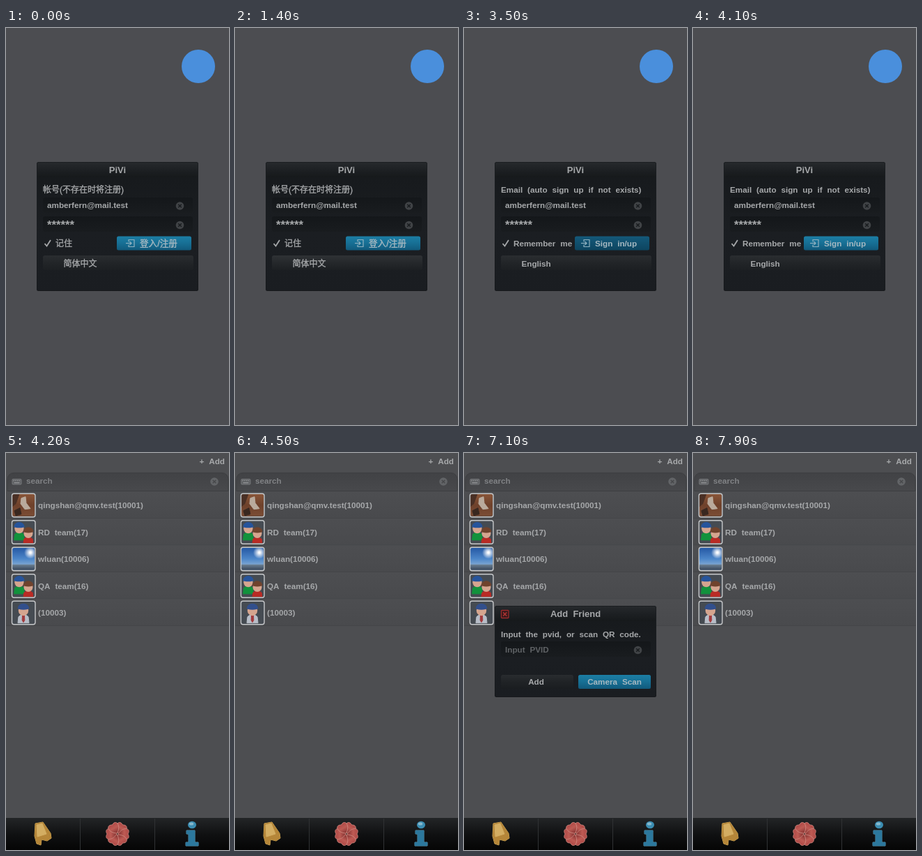
An HTML page with a canvas for the animation above (8 s loop, 320x569 px).

```html
<!DOCTYPE html>
<html lang="en">
<head>
<meta charset="utf-8">
<title>Messenger sign-in</title>
<style>
html, body { margin: 0; width: 100%; height: 100%; overflow: hidden; background: #4c4d51; }
canvas { display: block; width: 320px; height: 569px; }
</style>
</head>
<body>
<canvas id="stage"></canvas>
<script>
const W = 320, H = 569, LOOP = 8000;
const FONT = '"Liberation Sans", "Noto Sans CJK SC", "Noto Sans CJK", sans-serif';
const INK = '#a6a8aa', BUTTON_INK = '#a5b8c1';
const canvas = document.getElementById('stage');
const ctx = canvas.getContext('2d');
const ratio = window.devicePixelRatio || 1;
canvas.width = Math.round(W * ratio);
canvas.height = Math.round(H * ratio);
ctx.scale(ratio, ratio);

// Latin text is bold; Chinese text is regular with a thin outline.
function text(str, x, y, { size = 11.7, color = INK, align = 'left' } = {}) {
  const chinese = /[\u4e00-\u9fff]/.test(str);
  ctx.font = `${chinese ? 'normal' : 'bold'} ${size}px ${FONT}`;
  ctx.wordSpacing = '3.6px';
  ctx.textAlign = align;
  ctx.fillStyle = ctx.strokeStyle = color;
  ctx.fillText(str, x, y);
  if (chinese) {
    ctx.lineWidth = 0.35;
    ctx.strokeText(str, x, y);
  }
}

function vertical(y, h, colors) {
  const g = ctx.createLinearGradient(0, y, 0, y + h);
  colors.forEach((c, i) => g.addColorStop(i / (colors.length - 1), c));
  return g;
}

function box(x, y, w, h, fill, r = 0, stroke, width = 1) {
  ctx.beginPath();
  ctx.roundRect(x, y, w, h, r);
  ctx.fillStyle = Array.isArray(fill) ? vertical(y, h, fill) : fill;
  ctx.fill();
  if (stroke) {
    ctx.strokeStyle = stroke;
    ctx.lineWidth = width;
    ctx.stroke();
  }
}

function oval(x, y, rx, ry, fill, from = 0, to = Math.PI * 2) {
  ctx.beginPath();
  ctx.ellipse(x, y, rx, ry, 0, from, to);
  ctx.fillStyle = fill;
  ctx.fill();
}

function path(points, color, width, closed) {
  ctx.beginPath();
  for (let i = 0; i < points.length; i += 2) ctx.lineTo(points[i], points[i + 1]);
  if (closed) ctx.closePath();
  ctx.strokeStyle = color;
  ctx.lineWidth = width;
  ctx.stroke();
}

function shape(points, fill, stroke) {
  path(points, stroke || fill, 1, true);
  ctx.fillStyle = fill;
  ctx.fill();
}

function cross(x, y, r, color, width) {
  path([x - r, y - r, x + r, y + r], color, width);
  path([x - r, y + r, x + r, y - r], color, width);
}

function clearIcon(x, y, disc = '#404346', mark = '#191c1f') {
  oval(x, y, 5.8, 5.8, disc);
  cross(x, y, 2.3, mark, 1.5);
}

function panel(y, h, title) {
  box(44, y, 232, h, ['#1b1e21', '#1b1e22', '#17191c'], 2.5);
  box(45, y + 1, 230, 21, ['#26292c', '#1d2023', '#16191b'], [2, 2, 0, 0]);
  box(45, y + 22, 230, h - 23, ['#171a1d', '#1b1e22', '#1a1d21'], [0, 0, 2, 2]);
  text(title, 160, y + 16, { size: 13, align: 'center' });
}

function field(y) {
  box(53, y, 215, 22, ['#14171a', '#191c1f'], 3);
}

function blueButton(x, y, w, h, pressed) {
  box(x, y, w, h, pressed ? ['#14597a', '#0d4560'] : ['#1c7ea5', '#176f94', '#115a7c'], 2.5);
}

function enterIcon(x, y) {
  path([x + 4, y - 2, x + 4, y - 5, x + 12, y - 5, x + 12, y + 5, x + 4, y + 5, x + 4, y + 2], '#8fb1c0', 1.2);
  path([x, y, x + 8, y], '#8fb1c0', 1.2);
  path([x + 5.5, y - 2.5, x + 8, y, x + 5.5, y + 2.5], '#8fb1c0', 1.2);
}

const WORDS = {
  zh: { label: '帐号(不存在时将注册)', keep: '记住', enter: '登入/注册', lang: '简体中文', size: 12, enterSize: 12.6, icon: 172, enterX: 192 },
  en: { label: 'Email (auto sign up if not exists)', keep: 'Remember me', enter: 'Sign in/up', lang: 'English', size: 11.7, enterSize: 11.7, icon: 168, enterX: 188 }
};

function popup() {
  box(46, 284, 228, 92, '#191c1f');
  box(60, 286, 202, 27, ['#1d2023', '#232629'], 2);
  box(60, 316, 201, 27, ['#38446f', '#343f69']);
  box(60, 347, 202, 28, ['#232629', '#1c1f22'], 2);
  text('English', 90, 302);
  text('简体中文', 90.5, 333, { size: 12 });
  text('繁體中文', 90.5, 364, { size: 12 });
}

function login(words, { open, lit, pressed }) {
  box(0, 0, W, H, '#4c4d51');
  oval(276, 55, 24, 24, '#4a8fdc');
  panel(192, 185, 'PiVi');
  text(words.label, 53, 236, { size: words.size });
  field(243);
  field(270);
  text('amberfern@mail.test', 59, 258);
  text('******', 59, 288, { size: 16.7 });
  clearIcon(249.5, 255);
  clearIcon(249.5, 282.5);
  if (open) return popup();
  path([55.5, 309, 58.5, 312.5, 64, 304], INK, 1.8);
  text(words.keep, 71, 312.5, { size: words.size });
  blueButton(159, 298.5, 107, 20, pressed);
  enterIcon(words.icon, 308.5);
  text(words.enter, words.enterX, 312.5, { size: words.enterSize, color: BUTTON_INK });
  box(53, 326, 216, 21, lit ? ['#2f3235', '#25282b', '#1c1f22'] : ['#2a2d30', '#222528', '#1c1f22'], 3);
  text(words.lang, 82.5, 342, { size: words.size });
}

function person(x, y, s, hair, body, tie) {
  ctx.save();
  ctx.translate(x, y);
  ctx.scale(s, s);
  shape([-8, 17, -7, 8, -3, 5, 3, 5, 7, 8, 8, 17], body);
  if (tie) {
    shape([-1.5, 6, 1.5, 6, 1.8, 13, 0, 16, -1.8, 13], '#a33a3c');
  }
  oval(0, -1, 7.2, 7.5, '#d5a58f');
  oval(0, -4, 8.2, 7, hair, Math.PI, Math.PI * 2);
  oval(0, -4, 8.2, 2, hair);
  ctx.restore();
}

function petPhoto(y) {
  box(9, y - 16, 32, 32, ['#8a5639', '#6e412b', '#7b4d35']);
  shape([9, y - 16, 19, y - 16, 14, y - 2, 9, y + 2], '#4a3025');
  shape([22, y - 10, 28, y - 12, 29, y - 3, 35, y + 5, 27, y + 6, 21, y - 2], '#b9aa9c');
  shape([12, y + 8, 20, y + 4, 22, y + 13, 14, y + 15], '#392820');
}

function skyPhoto(y) {
  box(9, y - 16, 32, 32, ['#2558a4', '#4c86c9', '#a9c3db']);
  box(9, y + 8, 32, 8, ['#6d8295', '#38465a']);
  const sun = ctx.createRadialGradient(35, y - 9, 1, 35, y - 9, 9);
  sun.addColorStop(0, '#fff');
  sun.addColorStop(1, '#ffffff00');
  oval(35, y - 9, 9, 9, sun);
}

function avatar(kind, y) {
  box(8.5, y - 16.5, 33, 33, '#454b52', 3);
  ctx.save();
  ctx.beginPath();
  ctx.roundRect(9, y - 16, 32, 32, 2);
  ctx.clip();
  if (kind === 'pet') petPhoto(y);
  if (kind === 'sky') skyPhoto(y);
  if (kind === 'team') {
    person(19, y - 4, 0.92, '#26549b', '#12923c');
    person(32, y + 3, 0.9, '#70432d', '#b92b25');
  }
  if (kind === 'solo') person(25, y - 2, 1, '#324f8c', '#b8bec8', true);
  ctx.restore();
  ctx.beginPath();
  ctx.roundRect(8.5, y - 16.5, 33.5, 33.5, 3);
  ctx.strokeStyle = '#c6c8ca';
  ctx.lineWidth = 1.4;
  ctx.stroke();
}

const ROWS = [
  ['pet', 'qingshan@qmv.test(10001)'],
  ['team', 'RD team(17)'],
  ['sky', 'wluan(10006)'],
  ['team', 'QA team(16)'],
  ['solo', '(10003)']
];

function flower(x, y) {
  for (let i = 0; i < 6; i++) {
    ctx.save();
    ctx.translate(x, y);
    ctx.rotate(i * Math.PI / 3 + Math.PI / 6);
    ctx.beginPath();
    ctx.moveTo(0, -1);
    ctx.bezierCurveTo(-12, -9, -8, -20, 0, -15);
    ctx.bezierCurveTo(8, -20, 12, -9, 0, -1);
    ctx.fillStyle = vertical(-18, 17, ['#ab4442', '#bd5b54', '#82302f']);
    ctx.fill();
    ctx.strokeStyle = '#d08a80';
    ctx.lineWidth = 0.8;
    ctx.stroke();
    ctx.restore();
  }
}

function tabBar() {
  box(0, 523, W, 46, ['#232527', '#101112', '#050505']);
  for (const x of [106.5, 213.5]) path([x, 524, x, H], '#303234', 1);
  shape([42, 531, 53, 529, 64, 545, 65, 552, 59, 556, 51, 554, 50, 562, 44, 560, 41, 549], '#b58639', '#cfaa59');
  shape([44, 533, 52, 531, 58, 546, 45, 550], '#d3ad62');
  flower(160, 546);
  oval(267, 533, 6, 5.2, '#3b8db2');
  oval(266, 531.5, 3.2, 2, '#86b8cc');
  shape([259, 541, 271, 541, 271, 558, 276, 558, 276, 563, 258, 563, 258, 558, 262, 558, 262, 546, 259, 546], '#2c789d', '#5a9dba');
}

function contacts() {
  box(0, 0, W, H, '#4d4e51');
  text('+ Add', 314, 16, { align: 'right' });
  box(2, 28.5, 317, 26, ['#414245', '#48494c'], [9, 9, 0, 0], '#3d3e41');
  box(9, 37.5, 13, 7.5, '#5b5d60', 1, '#85878a', 0.8);
  for (let i = 0; i < 4; i++) box(10.5 + i * 2.7, 39, 1.6, 1.3, '#96989a');
  box(11.5, 42, 8, 1.3, '#96989a');
  text('search', 29, 44, { color: '#808285' });
  clearIcon(299, 41, '#626467', '#47484b');
  ROWS.forEach(([kind, name], i) => {
    const top = 55.5 + i * 38.5;
    box(0, top, W, 38, ['#4d4e51', '#494a4d']);
    path([0, top + 38, W, top + 38], '#434447', 0.8);
    avatar(kind, top + 19.2);
    text(name, 46, top + 23.5);
  });
  tabBar();
}

function addDialog() {
  panel(219, 131, 'Add Friend');
  box(53.5, 225.5, 10.5, 11, '#33191b', 1, '#9c2b2c', 1.3);
  cross(58.7, 231, 2.6, '#a93332', 1.6);
  text('Input the pvid, or scan QR code.', 53, 263.5);
  field(270);
  text('Input PVID', 59, 285.5, { color: '#5f6265' });
  clearIcon(249.5, 282.5);
  box(53, 318, 104, 20, ['#292c2f', '#202326', '#1a1d20'], 3);
  text('Add', 103.5, 332, { align: 'center' });
  blueButton(164, 318, 104, 20);
  text('Camera Scan', 216, 332, { color: BUTTON_INK, align: 'center' });
}

function draw(t) {
  ctx.clearRect(0, 0, W, H);
  if (t < 4200) {
    login(t < 2400 ? WORDS.zh : WORDS.en, {
      open: t >= 1500 && t < 2400,
      lit: t >= 1400 && t < 1500,
      pressed: t >= 3500 && t < 3700
    });
  } else {
    contacts();
    if (t >= 7000 && t < 7800) addDialog();
  }
}

const start = performance.now();
function tick() {
  draw((performance.now() - start) % LOOP);
  requestAnimationFrame(tick);
}
tick();
</script>
</body>
</html>
```
